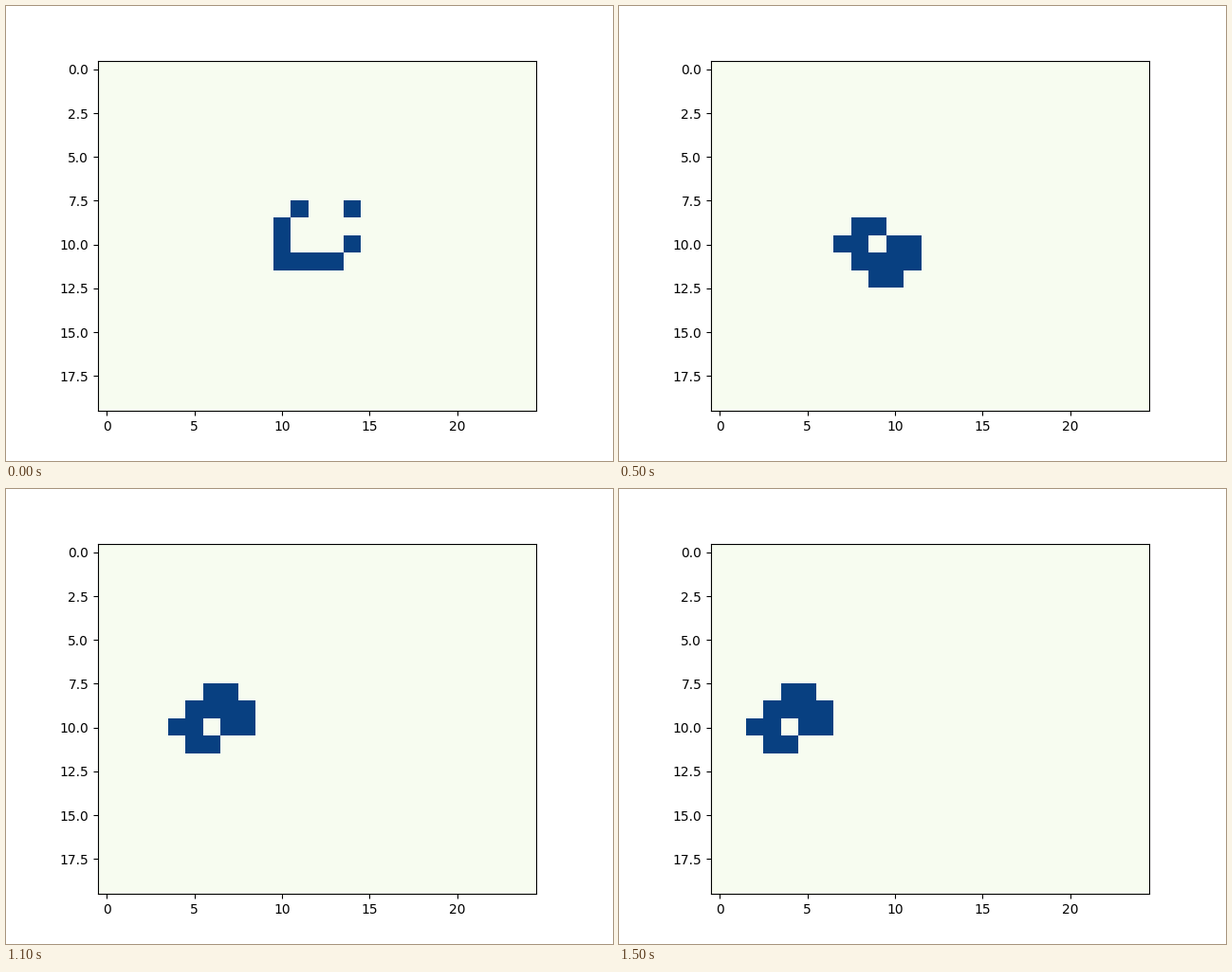
Animation of 640x480 px, one loop 1600 ms. Source, as a matplotlib script:

```python
import numpy as np
import matplotlib.pyplot as plt
from matplotlib.animation import FuncAnimation

ROWS, COLS = 20, 25
STEPS = 16
SHIP = ["_#__#",
        "#____",
        "#___#",
        "####_"]


def first_grid():
    """Place a lightweight spaceship, heading left, near the middle."""
    grid = np.zeros((ROWS, COLS), dtype=int)
    grid[8:12, 10:15] = [[c == "#" for c in row] for row in SHIP]
    return grid


def step(grid):
    """One generation of Conway's Game of Life on a torus."""
    neighbours = sum(np.roll(grid, (dy, dx), (0, 1))
                     for dy in (-1, 0, 1) for dx in (-1, 0, 1)
                     if (dy, dx) != (0, 0))
    alive = (neighbours == 3) | ((grid == 1) & (neighbours == 2))
    return alive.astype(int)


grids = [first_grid()]
while len(grids) < STEPS:
    grids.append(step(grids[-1]))

fig, ax = plt.subplots(figsize=(6.4, 4.8), dpi=100)
image = ax.imshow(grids[0], cmap="GnBu", vmin=0, vmax=1,
                  interpolation="nearest")


def update(i):
    image.set_data(grids[i])
    return [image]


anim = FuncAnimation(fig, update, frames=STEPS, interval=100,
                     repeat=True, repeat_delay=0)
plt.show()
```
